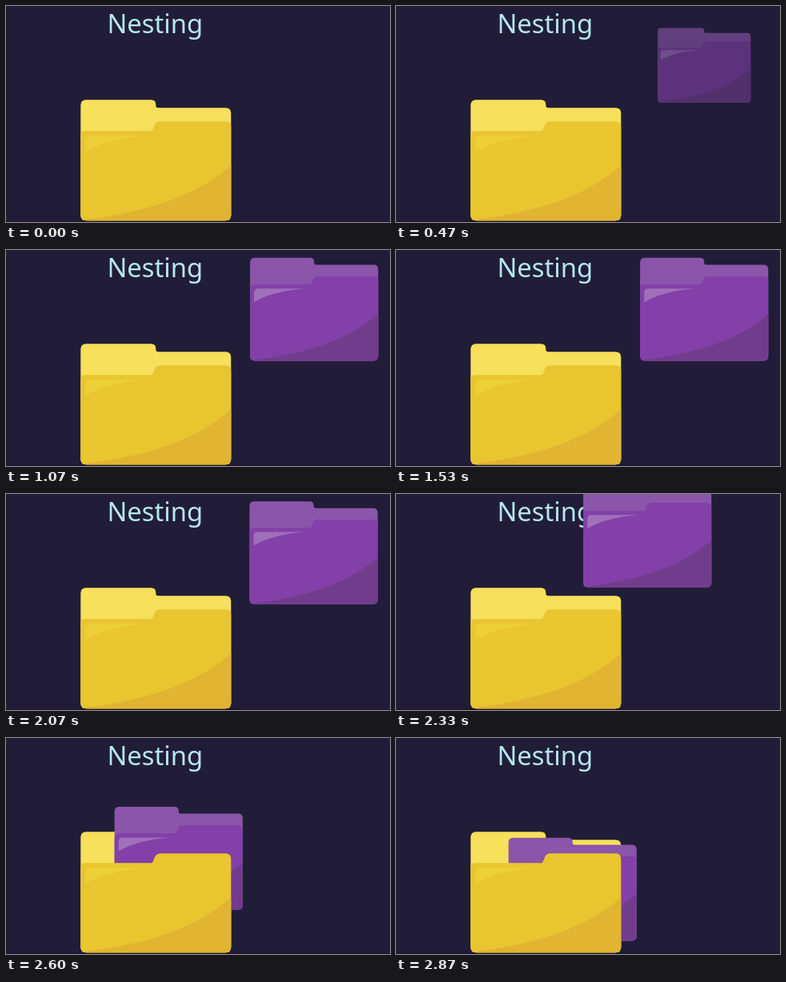
Animation of 480 by 270 pixels, one loop 3.39 s. Source, as an HTML page:

```html
<!DOCTYPE html>
<html lang="en">
<head>
<meta charset="utf-8">
<title>Nesting</title>
<style>
  html, body { margin: 0; width: 100%; height: 100%; overflow: hidden; background: #211d39; }
  svg { display: block; width: 100%; height: 100%; }
  text { font: 32.8px "Noto Sans", sans-serif; fill: #b5e6ee; }
  .yellow { --back: #f6e05c; --front: #e9c530; --gloss: #edd037; --shade: #e1b432; }
  .purple { --back: #8b55aa; --front: #8340a9; --gloss: #a070b9; --shade: #723c8c; }
</style>
</head>
<body>
<svg viewBox="0 0 480 270">
  <defs>
    <path id="back" fill="var(--back)"
      d="M0 7Q0 0 7 0H88Q94 0 94 6V7Q94 10 97 10H181Q188 10 188 17V144Q188 151 181 151H7Q0 151 0 144Z"/>
    <g id="front">
      <path fill="var(--front)"
        d="M0 45Q0 39 6 39H88Q90 39 91 36L93 31Q95 27 100 27H181Q188 27 188 34V144Q188 151 181 151H7Q0 151 0 144Z"/>
      <path fill="var(--gloss)" d="M6 65V51Q6 45 12 45H80Q32 49 6 65Z"/>
      <path fill="var(--shade)" d="M188 82Q130 135 4 150L7 151H181Q188 151 188 144Z"/>
    </g>
  </defs>
  <rect width="480" height="270" fill="#211d39"/>
  <rect y="268.5" width="480" height="1.5" fill="#1e1530"/>
  <text x="126.4" y="34">Nesting</text>
  <use href="#back" class="yellow" x="93.3" y="117.2"/>
  <g id="nested" class="purple">
    <use href="#back"/>
    <use href="#front"/>
  </g>
  <use href="#front" class="yellow" x="93.3" y="117.2"/>
</svg>
<script>
  const LOOP = 3390, STEP = 1000 / 15;
  const nested = document.getElementById('nested');

  const progress = (t, start, end) => Math.min(1, Math.max(0, (t - start) / (end - start)));
  const smooth = u => u * u * (3 - 2 * u);
  const smoother = u => u * u * u * (u * (6 * u - 15) + 10);
  const bezier = (s, b, c, d) =>
    3 * s * (1 - s) ** 2 * b + 3 * s * s * (1 - s) * c + s ** 3 * d;

  function draw(time) {
    // Motion advances at 15 steps per second.
    const t = Math.floor((time + 4) / STEP) * STEP;
    const pop = 1.093 * smooth(progress(t, 286, 582)) - 0.093 * smooth(progress(t, 582, 830));
    const s = smoother(progress(t, 2005, 2835));
    const x = 385.2 + bezier(s, -60, -199, -164.5);
    const y = 74.2 + bezier(s, -67, 22, 115);
    nested.setAttribute('opacity', progress(t, 286, 582));
    nested.setAttribute('transform',
      `translate(${x} ${y}) scale(${0.852 * pop}) translate(-94 -75.5)`);
  }

  function frame() {
    draw(performance.now() % LOOP);
    requestAnimationFrame(frame);
  }
  frame();
</script>
</body>
</html>
```
